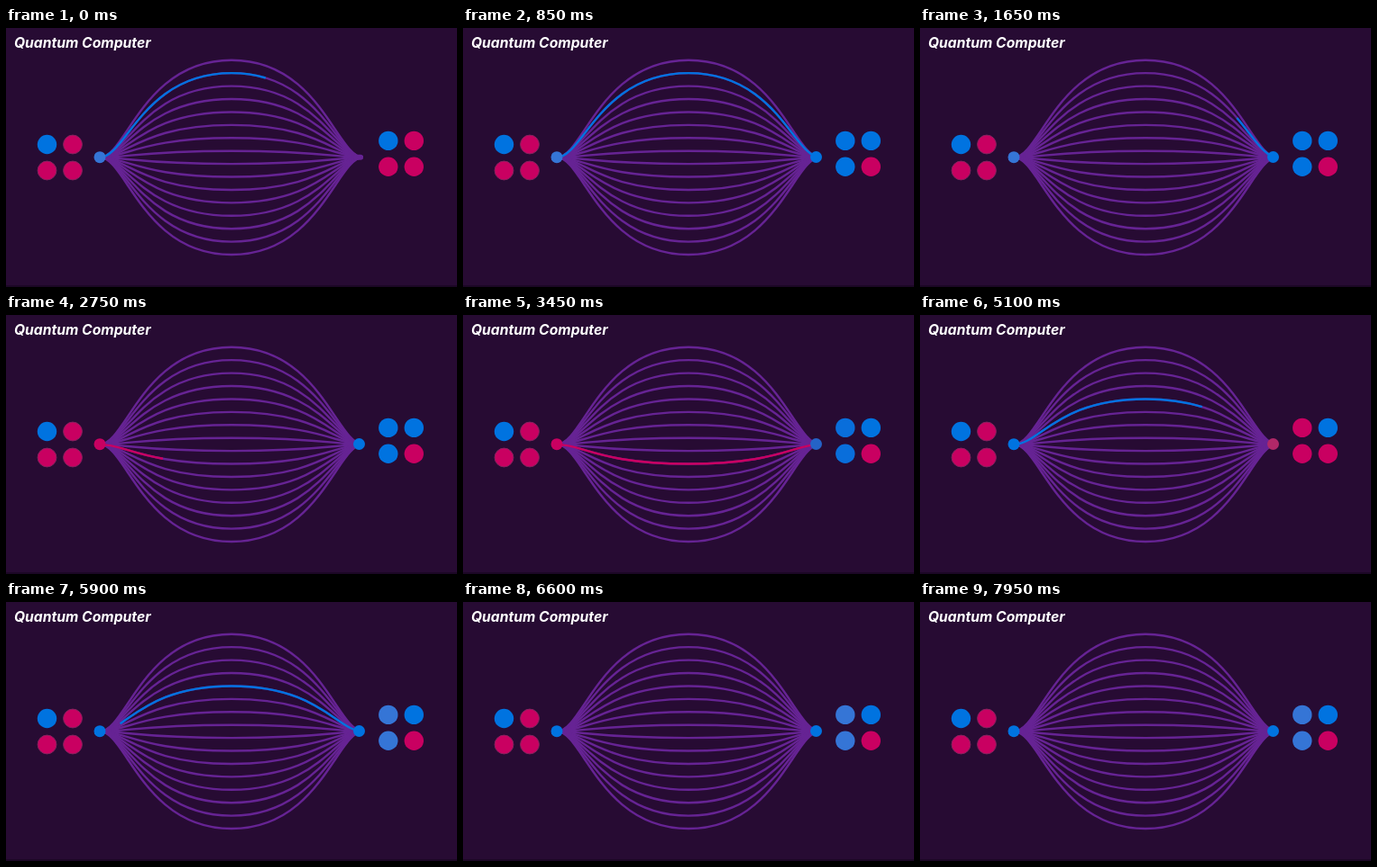
An HTML page for the animation above (8 s loop, 500x288 px).

```html
<!DOCTYPE html>
<html lang="en">
<head>
<meta charset="utf-8">
<title>Quantum Computer</title>
<style>
  :root {
    --blue: #0073e0;
    --soft-blue: #3575d6;
    --red: #c90061;
    --soft-red: #b02868;
    --loop: 8000ms linear infinite;
  }
  html, body { margin: 0; width: 100%; height: 100%; overflow: hidden; background: #270b33; }
  svg { display: block; width: 500px; height: 288px; }
  text {
    font: italic 700 15.7px Inter, "Open Sans", sans-serif;
    font-feature-settings: "cv11";
    fill: #fff;
  }
  .red { fill: var(--red); }
  .blue { fill: var(--blue); }
  .rim { stroke: #8a2260; stroke-width: 1; }
  .wires, .tip { fill: none; stroke: #662394; stroke-width: 2.4; }
  .tip { stroke-width: 6; stroke-linecap: round; }

  /* One dash as long as the wire: offset 1 is empty, 0 full, -1 gone again */
  .pulse {
    fill: none;
    stroke-width: 2.4;
    stroke-dasharray: 1 3;
    stroke-dashoffset: 1.02;
  }
  #first { stroke: var(--blue); animation: first var(--loop); }
  #second { stroke: var(--red); animation: second var(--loop); }
  #third { stroke: var(--blue); animation: third var(--loop); }

  @keyframes first {
    0% { stroke-dashoffset: .396; animation-timing-function: cubic-bezier(.3, .5, .65, 1); }
    5.425% { stroke-dashoffset: 0; }
    11.7% { stroke-dashoffset: 0; animation-timing-function: cubic-bezier(.37, 0, .63, 1); }
    24.2%, 100% { stroke-dashoffset: -1.01; }
  }
  @keyframes second {
    0%, 30.2% { stroke-dashoffset: 1.01; animation-timing-function: cubic-bezier(.37, 0, .63, 1); }
    42.7% { stroke-dashoffset: 0; }
    49.9% { stroke-dashoffset: 0; animation-timing-function: cubic-bezier(.37, 0, .63, 1); }
    62.4%, 100% { stroke-dashoffset: -1.01; }
  }
  @keyframes third {
    0%, 55.85% { stroke-dashoffset: 1.01; animation-timing-function: cubic-bezier(.37, 0, .63, 1); }
    68.35% { stroke-dashoffset: 0; }
    71.5% { stroke-dashoffset: 0; animation-timing-function: cubic-bezier(.37, 0, .63, 1); }
    84%, 100% { stroke-dashoffset: -1.01; }
  }

  #input { animation: input var(--loop); }
  #output { animation: output var(--loop); }
  #bit0 { animation: bit0 var(--loop); }
  #bit1 { animation: bit1 var(--loop); }
  #bit2 { animation: bit2 var(--loop); }

  @keyframes input {
    0%, 27.5% { fill: var(--soft-blue); }
    30%, 49.5% { fill: var(--red); }
    52%, 100% { fill: var(--blue); }
  }
  @keyframes output {
    0%, 5% { fill: var(--blue); fill-opacity: 0; }
    7.5%, 42.5% { fill: var(--blue); fill-opacity: 1; }
    45.5%, 68% { fill: var(--soft-red); }
    71%, 100% { fill: var(--blue); fill-opacity: 1; }
  }
  @keyframes bit0 {
    0%, 43% { fill: var(--blue); }
    46.2%, 68.5% { fill: var(--red); }
    71.5%, 100% { fill: var(--soft-blue); }
  }
  @keyframes bit1 {
    0%, 5.6% { fill: var(--red); }
    8.8%, 100% { fill: var(--blue); }
  }
  @keyframes bit2 {
    0%, 5.6% { fill: var(--red); }
    8.8%, 43% { fill: var(--blue); }
    46.2%, 68.5% { fill: var(--red); }
    71.5%, 100% { fill: var(--soft-blue); }
  }
</style>
</head>
<body>
<svg viewBox="0 0 500 288">
  <rect width="500" height="288" fill="#270b33"/>
  <rect y="286" width="500" height="2" fill="#1c0726"/>
  <text x="9" y="22">Quantum Computer</text>

  <g class="wires" id="wires"></g>
  <path class="tip" d="M388 143.8H393"/>
  <path class="pulse" id="first" pathLength="1"/>
  <path class="pulse" id="second" pathLength="1"/>
  <path class="pulse" id="third" pathLength="1"/>

  <circle id="input" cx="104" cy="143.7" r="6.5"/>
  <circle id="output" cx="391.5" cy="143.5" r="6.5"/>

  <circle class="blue" cx="45.5" cy="129.5" r="10.7"/>
  <circle class="red rim" cx="74" cy="129.5" r="10.4"/>
  <circle class="red rim" cx="45.5" cy="158.5" r="10.4"/>
  <circle class="red rim" cx="74" cy="158.5" r="10.4"/>

  <circle id="bit0" cx="423.8" cy="125.4" r="10.7"/>
  <circle id="bit1" cx="452.3" cy="125.4" r="10.7"/>
  <circle id="bit2" cx="423.8" cy="154.2" r="10.7"/>
  <circle class="red" cx="452.3" cy="154.2" r="10.7"/>
</svg>
<script>
  const MID = 143.9, COUNT = 16, GAP = 14.42;

  // Bell-shaped wire, counted from the top
  function wire(i) {
    const peak = MID + (i - (COUNT - 1) / 2) * GAP;
    return `M104 ${MID}C133 ${MID} 152 ${peak} 250 ${peak}S367 ${MID} 396 ${MID}`;
  }

  const wires = document.getElementById("wires");
  for (let i = 0; i < COUNT; i++) {
    const path = document.createElementNS("http://www.w3.org/2000/svg", "path");
    path.setAttribute("d", wire(i));
    wires.append(path);
  }

  const route = { first: 1, second: 9, third: 4 };
  for (const id in route) document.getElementById(id).setAttribute("d", wire(route[id]));
</script>
</body>
</html>
```
